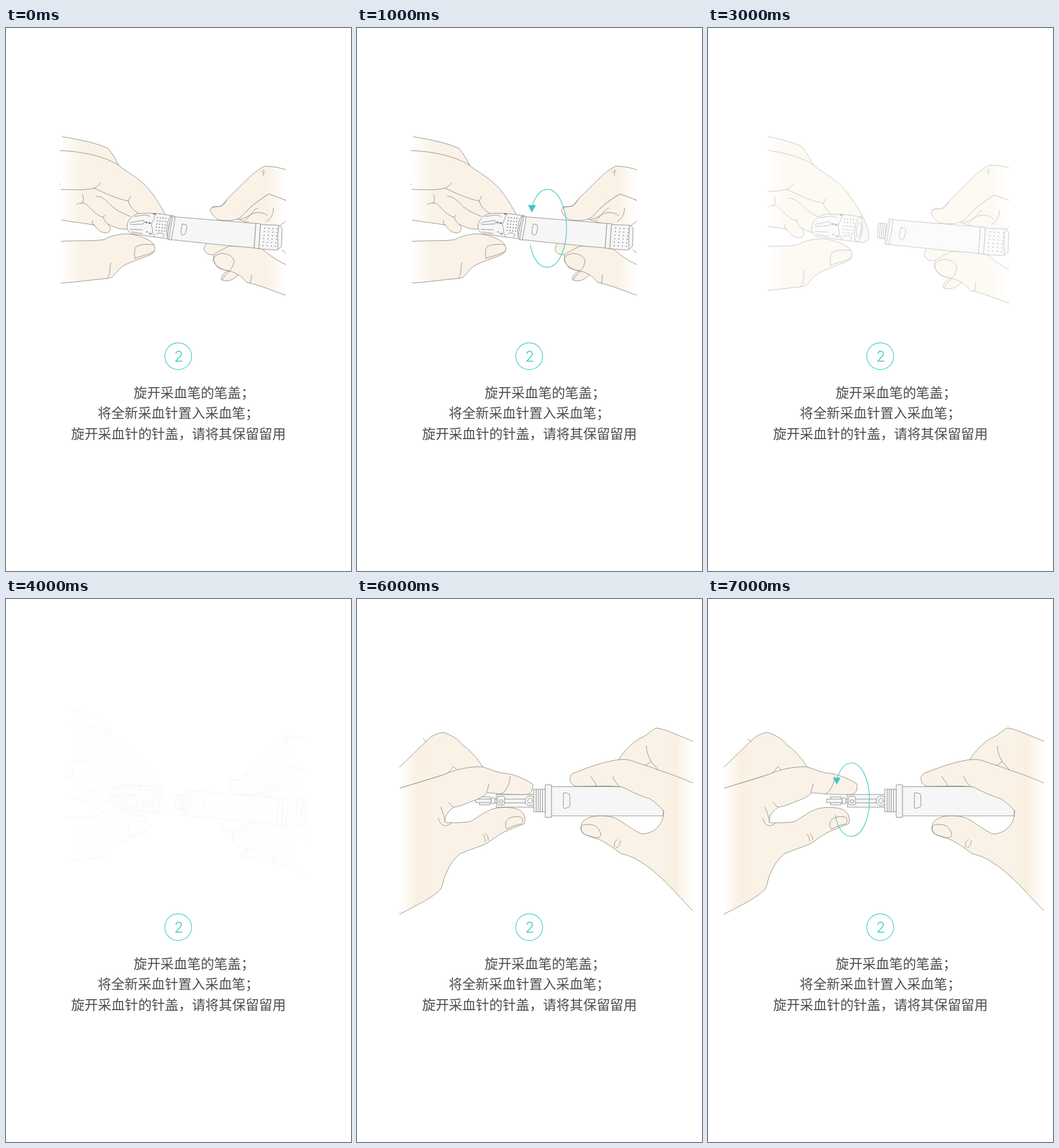
An HTML page that plays this animation: 596 by 939 pixels, repeating every 8 s.

```html
<!DOCTYPE html>
<html lang="zh-CN">
<head>
<meta charset="utf-8">
<style>
html, body { margin: 0; width: 100%; height: 100%; overflow: hidden; background: #fff; }
svg { display: block; width: 596px; height: 939px; }
path, rect, circle, ellipse { stroke: #8a8885; stroke-width: .9; stroke-linejoin: round; stroke-linecap: round; vector-effect: non-scaling-stroke; }
.line { fill: none; }
.metal { fill: #f6f6f7; }
.cover { fill: #fff; stroke: none; }
.dots { fill: none; stroke: #555; stroke-width: 1.7; }
.turn path { fill: none; stroke: #3fc8ca; stroke-width: 1.2; }
.turn .tip { fill: #3fc8ca; stroke: none; }
text { font-family: "Noto Sans CJK SC", "Noto Sans CJK", "Noto Sans", sans-serif; font-weight: 300; fill: #4c4c4c; font-size: 23.2px; }
.mark { font-size: 6.5px; font-weight: 700; fill: #444; }
.step { font: 300 26px Inter, "Liberation Sans", sans-serif; fill: #45cbcd; }
.ring { fill: none; stroke: #45cbcd; stroke-width: 1.2; }
</style>
</head>
<body>
<svg viewBox="0 0 596 939" xmlns="http://www.w3.org/2000/svg">
<defs>
  <linearGradient id="fadeL" gradientUnits="userSpaceOnUse" y1="0" y2="0"><stop stop-color="#fff"/><stop offset="1" stop-color="#faf2e6"/></linearGradient>
  <linearGradient id="fadeR" gradientUnits="userSpaceOnUse" y1="0" y2="0"><stop stop-color="#faf2e6"/><stop offset="1" stop-color="#fff"/></linearGradient>
  <linearGradient id="sideL" gradientUnits="userSpaceOnUse" x1="30" x2="80" y1="0" y2="0"><stop stop-color="#fff"/><stop offset=".6" stop-color="#faf0e2"/><stop offset="1" stop-color="#faf2e6"/></linearGradient>
  <linearGradient id="sideR" gradientUnits="userSpaceOnUse" x1="530" x2="581" y1="0" y2="0"><stop stop-color="#faf2e6"/><stop offset=".4" stop-color="#faf0e2"/><stop offset="1" stop-color="#fff"/></linearGradient>
</defs>

<g id="uncap">
  <g class="right" fill="url(#fadeR)">
    <path d="M483,298 C474,293 463,290 454,287 C446,292 430,302 417,315 L400,331 L430,340 L470,344 L483,334"/>
    <path d="M483,245 C471,241 458,239 447,239 C440,242 433,247 425,254 C411,267 396,283 384,294 C379,300 376,304 372,308 C364,309 355,309 353,314 C354,321 361,330 369,332 C384,334 396,333 404,328 C412,322 420,311 428,305 C437,298 447,291 454,287 C464,291 475,294 483,298"/>
    <path class="line" d="M355,310 C363,307 368,312 377,304 L382,297 M441,247 C444,250 445,252 445,255 M445,245 L446,250 M435,312 C430,310 425,322 413,333 M462,311 C463,321 457,331 450,334 M404,331 C415,330 423,320 434,319 C442,319 449,321 452,325"/>
    <path d="M346,373 C341,379 341,386 347,390 C353,393 360,392 366,391 L390,378"/>
    <path d="M386,419 C377,422 372,429 372,435 C377,439 389,437 394,433 L404,425"/>
    <path class="line" d="M374,435 C378,427 383,424 388,419"/>
  </g>
  <g class="left" fill="url(#fadeL)">
    <path d="M97,188 C130,193 158,200 176,208 C184,217 190,228 195,238 L190,270 L93,220"/>
    <path d="M96,332 C115,336 135,337 153,341 C158,350 168,357 177,353 C182,349 180,343 176,339 C188,345 200,350 212,347 L238,322 L200,275 L93,270"/>
    <path d="M93,212 C132,213 174,223 195,238 C206,247 216,252 225,259 C234,266 240,271 246,278 C258,292 270,312 277,327 C283,340 285,352 282,358 C278,363 270,363 264,360 L240,325 C226,321 215,312 211,299 C192,296 168,284 152,277 C135,281 115,280 95,279"/>
    <path class="line" d="M152,277 C157,275 161,271 164,267 M215,291 C214,295 211,297 211,300 M132,288 C135,294 134,300 131,304 M122,305 C129,302 134,301 139,305 C149,315 158,325 167,327 L171,324 M156,291 C170,291 177,304 186,311 C195,318 206,322 215,326 M149,333 C149,337 150,340 153,341 M168,327 C170,333 173,337 177,340"/>
  </g>
  <g id="cap" class="metal">
    <path d="M179,345 C180,335 189,326 199,323 C212,321 230,322 247,324 L266,327 L259,370 C235,367 205,363 187,360 C181,357 179,351 179,345Z"/>
    <path class="line" d="M232,322 C234,326 228,329 229,334 C224,338 224,347 227,351 C225,357 229,361 231,367"/>
    <ellipse cx="260" cy="348" rx="6.5" ry="21.5" transform="rotate(7 260 348)"/>
    <ellipse cx="260.5" cy="348.5" rx="4" ry="12.5" transform="rotate(7 260.5 348.5)"/>
    <path class="line" d="M210,335 L187,339 Q183,342 187,343 L210,342 Q213,338 210,335 M208,353 L185,352 M188,357 L208,360 M193,328 L214,325 L222,328 M233,362 C236,357 246,358 248,362 L246,366"/>
    <path id="capDots" class="dots"/>
    <text class="mark" transform="translate(228,321) rotate(94)">3</text>
    <text class="mark" transform="translate(219,338) rotate(94)">4</text>
    <text class="mark" transform="translate(213,337) rotate(94)">#</text>
    <text class="mark" transform="translate(221,358) rotate(94)">2</text>
    <text class="mark" transform="translate(215,356) rotate(94)">ı</text>
  </g>
  <g class="left" fill="url(#fadeL)">
    <path d="M95,369 C120,367 150,369 169,366 C179,360 194,356 210,356 C225,357 242,363 251,370 C258,376 259,384 254,389 C245,396 222,401 205,410 C194,416 191,424 184,430 C181,432 178,433 175,433 C150,435 120,440 95,441"/>
    <path class="line" d="M181,406 C178,415 182,425 175,433 M223,399 C221,390 222,382 225,378 C234,373 247,374 256,375 M257,385 C248,392 235,394 223,398"/>
  </g>
  <g class="right">
    <g id="thread" class="metal">
      <path d="M269,333 L272,332 L281,333 L279,357 L270,356 L267,354Z"/>
      <path class="line" d="M272,332 L270,356 M275,333 L273,357 M278,333 L276,357"/>
    </g>
    <g class="metal">
      <path d="M291,326.500 L432,338 L429,381 L285,366Z"/>
      <path d="M286,325 L292,326 C291,340 288,354 285,367 L279,365 C279,352 282,338 286,325Z"/>
      <path class="line" d="M288,326 C285,340 283,353 281,366"/>
      <path d="M305,339 L311,340 Q313,342 312,346 L310,355 Q309,358 306,358 L303,357 Q301,349 305,339Z"/>
      <path d="M432,338 L440,338.500 L437,382 L429,381Z"/>
      <path d="M440,340 L470,341 Q476,342 477,348 L476,377 Q473,382 467,384 L437,382Z"/>
      <path class="line" d="M471,342 Q468,363 470,383"/>
      <path id="gripDots" class="dots"/>
    </g>
    <g fill="url(#fadeR)">
      <path d="M483,409 C468,402 455,393 444,383 C426,379 400,378 386,377 C378,381 365,387 360,391 C356,398 360,408 366,414 C374,420 389,419 398,425 C405,428 411,434 416,440 C437,444 462,455 483,462"/>
      <path class="line" d="M358,401 C360,393 366,390 375,390 C386,391 394,397 394,404 C392,412 389,419 384,420 C373,418 361,413 358,401Z M424,427 C424,433 423,438 422,441 M477,384 L483,389"/>
    </g>
  </g>
  <g id="covers">
    <rect class="cover" x="60" y="170" width="43.500" height="310"/>
    <rect class="cover" x="520" y="170" width="40" height="310"/>
  </g>
</g>

<g id="insert">
  <g id="sideHandBack" fill="url(#sideL)">
    <path d="M30,291 C52,270 74,247 85,238 C92,234 100,231 107,231 C116,235 131,240 139,253 C151,260 165,276 174,291 L131,297 L123,290 C118,297 114,302 106,304 L31,327"/>
    <path class="line" d="M71,242 L77,247"/>
  </g>
  <g id="lancet" class="metal">
    <rect x="169" y="342" width="18" height="14"/>
    <rect x="162" y="346" width="27" height="6"/>
    <rect x="189" y="344" width="6" height="10" rx="1"/>
    <path class="line" d="M195,346 H198 M195,352 H198"/>
    <rect x="198" y="338" width="92" height="22"/>
    <path class="line" d="M211,346 H277 M211,352.500 H277"/>
    <rect x="200" y="341" width="12" height="15" rx="2"/>
    <circle cx="206" cy="350" r="3"/>
    <circle cx="256" cy="349" r="8.500"/>
    <circle cx="256" cy="349" r="4.200"/>
    <path class="line" d="M277,344 Q277,341 280,341 H287 Q289,341 289,344 V353 Q289,356 287,356 H280 Q277,356 277,353 M277,346 H283.500 V353 H277Z"/>
  </g>
  <g id="sideHand" fill="url(#sideL)">
    <path d="M31,327 C60,318 92,309 108,303 C126,295 148,290 172,290 C184,293 195,299 207,301 C227,302 244,310 260,320 C261,327 259,334 254,337 C248,339 222,338 205,337 L182,335 C176,341 168,345 160,348 C146,353 134,359 124,360 C117,365 111,371 109,378 C107,384 109,387 113,387 C125,387 140,387 152,385 C162,380 172,371 188,364 C202,359 226,359 237,365 C246,370 249,381 245,389 C235,393 215,400 205,406 C195,412 185,420 178,424 C160,431 144,436 134,441 C119,453 112,470 107,483 C105,490 104,498 100,503 C85,518 55,532 30,545"/>
    <path class="line" d="M184,320 C184,326 181,330 180,335 M221,307 C221,317 217,325 211,333 C209,335 207,336 205,337 M115,352 Q118,357 124,360 M101,360 C105,370 108,377 109,386 M97,379 C99,388 105,393 110,392 Q116,391 119,388 M213,389 C213,383 218,378 226,377 C235,375 241,377 242,380 C243,384 243,387 240,389 C230,391 222,394 216,398 Q212,394 213,389Z M174,407 C177,411 178,414 178,419 M178,405 C182,409 184,413 183,417"/>
  </g>
  <g class="metal">
    <rect x="336" y="324.500" width="193" height="50.500"/>
    <rect x="320" y="329" width="6" height="39"/>
    <rect x="305.500" y="329" width="15" height="39"/>
    <path class="line" d="M309.500,329 V368 M313,329 V368 M316.500,329 V368"/>
    <rect x="325.500" y="321.500" width="10.500" height="56"/>
    <path d="M358,335 L364,336 Q367,336 367.500,340 L368,356 Q368,360 365,360.500 L359,362 Q356.500,363 356.500,359 V338 Q356,335 358,335Z"/>
  </g>
  <g fill="url(#sideR)">
    <path stroke-opacity="0" d="M499,288 L518,224 L580,246 V318 L521,296"/>
    <path d="M580,246 C560,238 535,226 518,223 C511,224 503,235 491,240 C479,245 459,265 452,278 L499,288 L508,281 L521,296"/>
    <path class="line" d="M500,254 C500,265 504,273 508,281"/>
    <path d="M580,318 C565,312 545,303 521,296 C505,289 485,284 473,279 C465,277 452,277 440,280 C422,283 400,291 380,299 C371,301 367,306 368,312 C369,319 374,324 381,324 C405,324 435,322 458,325 C472,332 490,341 505,345 C514,350 522,359 530,366 C530,372 529,378 527,383 C520,399 505,407 491,406 C478,400 465,390 452,382 C445,377 432,375 420,375 C409,375 399,377 391,384 C387,389 385,398 389,404 C398,412 415,412 428,421 C440,428 449,435 457,441 C464,442 474,445 486,452 C525,475 551,510 580,539"/>
    <path class="line" d="M404,307 C407,313 412,316 414,323 M442,307 C444,314 449,319 454,325 M387,397 C387,391 392,389 400,390 C412,390 417,395 421,405 C422,411 418,413 412,413 L395,408 Q388,404 387,397Z M450,416 C445,419 444,424 445,429 M455,418 C454,425 452,429 448,430"/>
  </g>
</g>

<g id="turn" class="turn">
  <path d="M222.500,312 C228,294 237,283.500 248,283.500 C265,283.500 279,312 279,347 C279,382 265,410.500 248,410.500 C235,410.500 224,398 220,374"/>
  <path class="tip" d="M216,309 H229 L222.500,321Z"/>
</g>

<circle class="ring" cx="297.500" cy="567.500" r="23.200"/>
<text class="step" x="298.500" y="577" text-anchor="middle">2</text>
<text x="220.500" y="638.500">旋开采血笔的笔盖；</text>
<text x="158.500" y="674">将全新采血针置入采血笔；</text>
<text x="112.500" y="709.500">旋开采血针的针盖，请将其保留留用</text>
</svg>
<script>
const $ = id => document.getElementById(id);
const set = (el, attrs) => { for (const k in attrs) el.setAttribute(k, attrs[k]); };
const show = (el, on) => { el.style.display = on ? "" : "none"; };
const fit = (s, x, y) => `matrix(${s} 0 0 ${s} ${x} ${y})`;
const place = (cls, tf) => document.querySelectorAll("." + cls).forEach(el => set(el, { transform: tf }));

function dots(id, x, y, cols, rows, dx, dy) {
  let d = "";
  for (let c = 0; c < cols; c++)
    for (let r = 0; r < rows; r++)
      d += `M${x + c * dx - r * .6},${y + r * dy + c * .5}h.01`;
  set($(id), { d });
}
dots("capDots", 236, 330, 4, 5, 5.2, 6);
dots("gripDots", 447, 346, 4, 6, 7.2, 6);

// joined or pulled apart
function poseUncap(open) {
  place("left", open ? fit(1.08, -28.6, -20) : "");
  place("right", open ? fit(1.08, 4.3, -21) : "");
  set($("cap"), { transform: open ? "" : fit(.926, 43.2, 22.2) });
  set($("fadeL"), open ? { x1: 122, x2: 152 } : { x1: 94, x2: 132 });
  set($("fadeR"), open ? { x1: 446, x2: 477 } : { x1: 452, x2: 483 });
  show($("thread"), open);
  show($("covers"), open);
}

function poseInsert(hand, lancet) {
  for (const id of ["sideHand", "sideHandBack"]) set($(id), { transform: `translate(${hand})` });
  set($("lancet"), { transform: `translate(${lancet})` });
}

const fade = [1, 1, 1, .5, .1];
let last = -1;
function draw(t) {
  const step = Math.floor(t / 1000) % 8;
  if (step === last) return;
  last = step;
  const first = step < 5;
  show($("uncap"), first);
  show($("insert"), !first);
  show($("turn"), step === 1 || step === 7);
  if (first) {
    poseUncap(step > 1);
    $("uncap").style.opacity = fade[step];
    set($("turn"), { transform: fit(1.06, 66.3, -21.3) });
  } else {
    poseInsert([0, 43.5, -2.5][step - 5], step > 5 ? 43 : 0);
    set($("turn"), { transform: "" });
  }
}

const start = performance.now();
function tick() {
  draw(performance.now() - start);
  requestAnimationFrame(tick);
}
tick();
</script>
</body>
</html>
```
